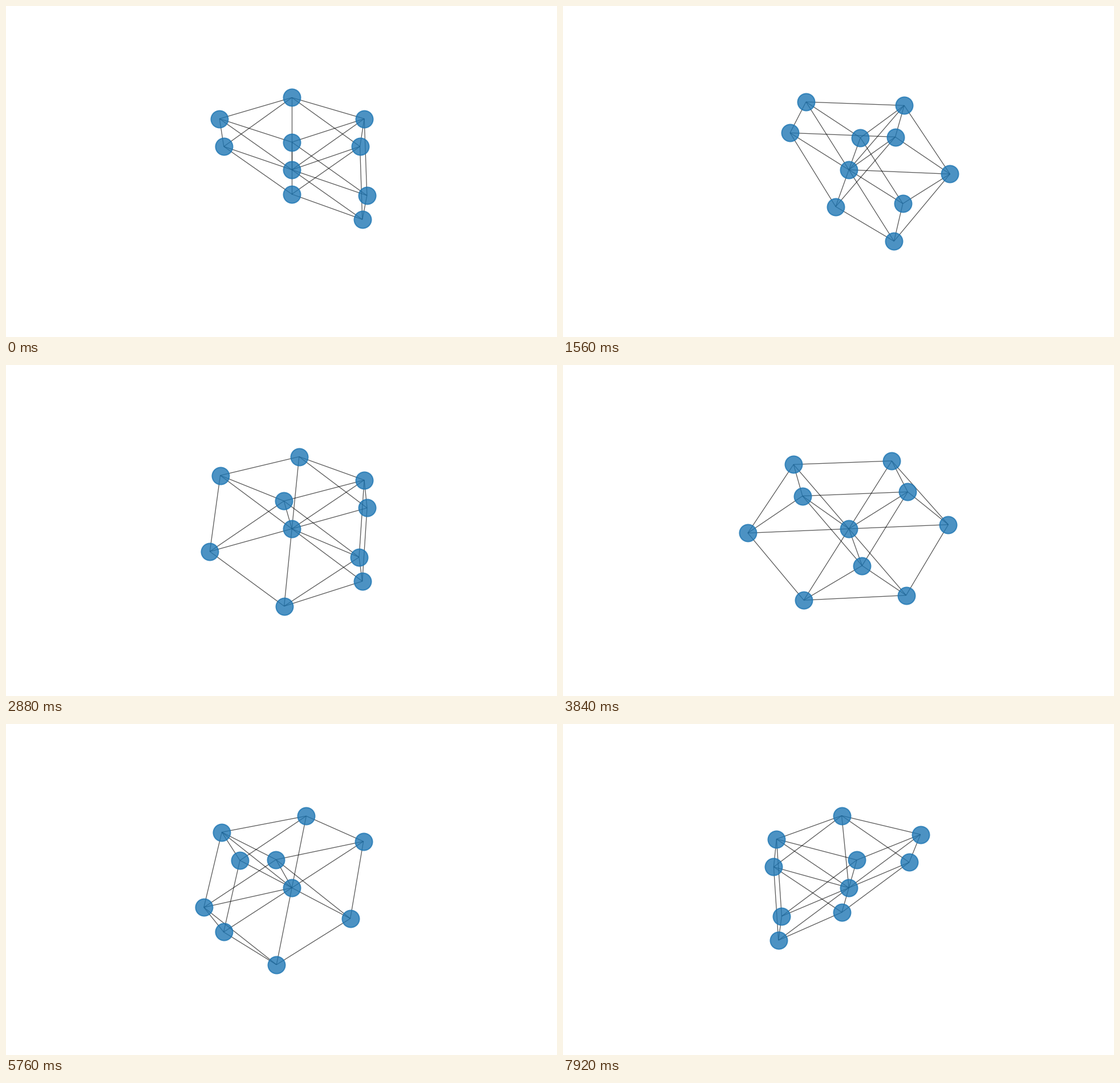
These frames come from a looping animation (966x580 px, 8 s). A matplotlib script:

```python
import itertools

import matplotlib.pyplot as plt
import numpy as np
from matplotlib.animation import FuncAnimation
from matplotlib.collections import LineCollection

W, H, DPI = 966, 580, 100
PX = 72 / DPI                      # one pixel in points
CENTER = np.array([501.2, 287.0])  # screen place of the pivot
ELEV = np.radians(20)
DIST = 10                          # camera distance
HALF_XY = 0.5225                   # half width of the scaled lattice
HALF_Z = 0.75 * HALF_XY
FOCAL = 2396
STEP = np.radians(4)               # turn per pose
TICK, HOLD = 40, 3                 # ms per frame, frames per pose
BLUE = "#1f77b4"


def lattice():
    """Centre of a close packing and its neighbours, one face cut away."""
    cells = itertools.product((-1, 0, 1), repeat=3)
    return np.array([p for p in cells
                     if sum(map(abs, p)) in (0, 2) and sum(p) != -2])


def bonds(points):
    pairs = itertools.combinations(range(len(points)), 2)
    return np.array([(i, j) for i, j in pairs
                     if np.sum((points[i] - points[j]) ** 2) == 2])


def project(points, turn):
    """Return screen positions and nearness to the camera."""
    x, y, z = points.T
    c, s = np.cos(turn), np.sin(turn)
    side = HALF_XY * (x * c + y * s)
    back = HALF_XY * (y * c - x * s)
    z = HALF_Z * z
    near = z * np.sin(ELEV) - back * np.cos(ELEV)
    up = z * np.cos(ELEV) + back * np.sin(ELEV)
    scale = FOCAL / (DIST - near)
    return CENTER + np.column_stack([side * scale, -up * scale]), near


nodes = lattice()
edges = bonds(nodes)

fig = plt.figure(figsize=(W / DPI, H / DPI), dpi=DPI, facecolor="white")
ax = fig.add_axes([0, 0, 1, 1])
ax.set_xlim(0, W)
ax.set_ylim(H, 0)
ax.axis("off")

lines = LineCollection([], colors="black", alpha=0.65, linewidths=1.3 * PX,
                       zorder=1)
ax.add_collection(lines)
dots = ax.scatter(nodes[:, 0], nodes[:, 1], s=(30 * PX) ** 2, color=BLUE,
                  alpha=0.8, linewidths=2 * PX, zorder=2)


def draw(frame):
    pos, near = project(nodes, STEP * (frame // HOLD))
    lines.set_segments(pos[edges])
    dots.set_offsets(pos[np.argsort(near)])
    return lines, dots


anim = FuncAnimation(fig, draw, frames=200, interval=TICK, repeat=True,
                     repeat_delay=0, blit=False)
plt.show()
```
